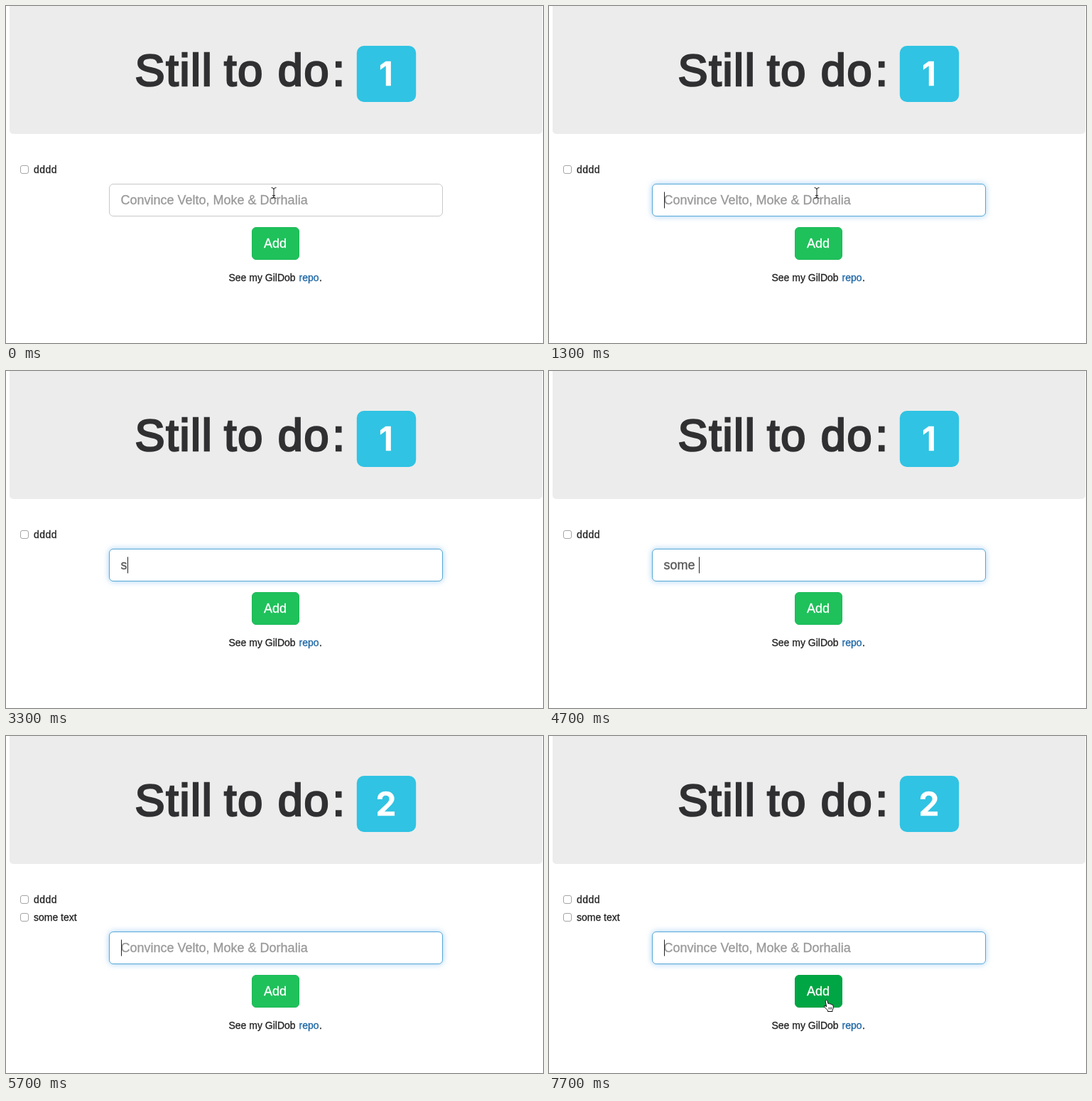
An HTML page for the animation above (8 s loop, 756x474 px).

```html
<!DOCTYPE html>
<html lang="en">
<head>
<meta charset="utf-8">
<title>Still to do</title>
<style>
  html, body { margin: 0; width: 100%; height: 100%; overflow: hidden; background: #fff; }
  svg { display: block; }
  text {
    font: 14px "Liberation Sans", Helvetica, Arial, sans-serif;
    fill: currentColor; stroke: currentColor; stroke-width: .3px;
    color: #222; white-space: pre;
  }
  .title text { font-size: 63px; letter-spacing: 1.7px; stroke-width: 2.6px; color: #303032; }
  #count { font: bold 46px Inter, Helvetica, sans-serif; color: #fff; text-anchor: middle; }
  .box { fill: #fff; stroke: #a5a5a5; }
  .wide { letter-spacing: .45px; }
  .field text, .button text { font-size: 18px; }
  #typed { color: #555; }
  #placeholder { color: #999; }
  .button text { color: #fff; text-anchor: middle; }
  text.link { color: #1b66a5; }
</style>
</head>
<body>
<svg width="756" height="474" viewBox="0 0 756 474">
  <path d="M5 0H755V175a5 5 0 0 1-5 5H10a5 5 0 0 1-5-5Z" fill="#ececec"/>
  <g class="title">
    <text x="181.5" y="111.5">Still</text>
    <text x="307" y="111.5">to</text>
    <text x="382.8" y="111.5">do</text>
    <text x="459.5" y="111.5">:</text>
  </g>
  <rect x="493.8" y="56" width="83.4" height="79" rx="10" fill="#30c3e3"/>
  <text id="count" x="535" y="111.5">1</text>

  <rect class="box" x="20.5" y="224.5" width="11" height="11" rx="2.5"/>
  <text class="wide" x="39" y="235">dddd</text>
  <g id="added">
    <rect class="box" x="20.5" y="249.5" width="11" height="11" rx="2.5"/>
    <text x="39" y="260">some text</text>
  </g>

  <g id="form">
    <g class="field">
      <rect id="input" x="145.5" y="250.5" width="469" height="45" rx="5.5" fill="#fff"/>
      <text id="placeholder" x="161.5" y="279">Convince Velto, Moke &amp; Dorhalia</text>
      <text id="typed" x="161.5" y="279"></text>
      <path id="caret" d="M.5 261.5V284.5" stroke="#222"/>
    </g>
    <g class="button">
      <rect id="button" x="346.5" y="311.5" width="66" height="45" rx="5.5"/>
      <text x="379" y="340">Add</text>
    </g>
    <text x="313.5" y="387">See my GilDob</text>
    <text class="link" x="412.5" y="387">repo</text>
    <text x="441" y="387">.</text>
  </g>

  <path id="beam" fill="none" stroke="#222" d="M-3.5-7.5Q0-7.5 0-5Q0-7.5 3.5-7.5M0-5.5V5.5M-3.5 7.5Q0 7.5 0 5Q0 7.5 3.5 7.5M-2 3.5H2"/>
  <path id="arrow" d="M0 0V15L3.4 11.8L5.7 17L8 16L5.8 11H10.5Z" fill="#111" stroke="#fff"/>
  <g id="hand" stroke="#111" stroke-linejoin="round">
    <path d="M-1.5 1Q0-1 1.5 1L2.5 5Q4 4 5 5.5Q6.5 4.8 7.5 6.3Q9.5 6 9.8 8.5Q10.3 12 8.5 14V16H2V14.5L-3 9.5Q-3.5 7.5-1.5 8L.2 9.3Z" fill="#fff"/>
    <path d="M3.5 10V13M5.5 10V13M7.3 10V13" fill="none" stroke-width=".8"/>
  </g>
</svg>
<script>
const LOOP = 8000, STEP = 100, SUBMIT = 5700;
const $ = id => document.getElementById(id);
const clamp = v => Math.max(0, Math.min(1, v));
const mix = (a, b, k) => a + (b - a) * k;
const show = (id, on) => $(id).setAttribute("visibility", on ? "visible" : "hidden");

// [time, content of the field]
const typing = [[0, ""]];
const type = (text, from, ...times) =>
  times.forEach((time, i) => typing.push([time, text.slice(0, from + i)]));
type("dhdhhddh", 1, 1400, 1500, 1600, 1700, 1800, 2300, 2400, 2500);
for (const [time, length] of [[2900, 6], [3000, 4], [3100, 2], [3200, 1]])
  type("dhdhhddh", length, time);
type("some text", 1, 3300, 3500, 3900, 4400, 4700, 4800, 5000, 5100, 5300);
typing.push([SUBMIT, ""]);

// [time, x, y] of the pointer's hot spot
const path = [[0, 377, 263], [6000, 377, 268], [6400, 381.5, 365],
              [6600, 381.5, 365], [6800, 390.5, 371.5], [LOOP, 390.5, 371.5]];

function pointerAt(t) {
  const i = path.findIndex(p => p[0] > t);
  const [a, b] = [path[i - 1], path[i]];
  const k = (t - a[0]) / (b[0] - a[0]);
  return t < 6000 ? path[0].slice(1) : [mix(a[1], b[1], k), mix(a[2], b[2], k)];
}

function draw(t) {
  const done = t >= SUBMIT;
  const shift = done ? 25 : 0;
  $("count").textContent = done ? 2 : 1;
  show("added", done);
  $("form").setAttribute("transform", `translate(0 ${shift})`);

  const focus = clamp((t - 600) / 300);
  const channel = (a, b) => Math.round(mix(a, b, focus));
  $("input").style.stroke = `rgb(${channel(200, 88)},${channel(200, 168)},${channel(200, 214)})`;
  $("input").style.filter = focus ? `drop-shadow(0 0 4px rgba(102,175,233,${.6 * focus}))` : "none";

  const value = typing.filter(k => k[0] <= t).pop()[1];
  const typed = $("typed");
  typed.textContent = value;
  typed.setAttribute("class", value[0] === "d" ? "wide" : "");
  show("placeholder", !value);

  const blinkedOff = (t >= 6100 && t < 6600) || (t >= 7200 && t < 7700);
  show("caret", focus > 0 && !blinkedOff);
  const end = value ? typed.getComputedTextLength() : 0;
  $("caret").setAttribute("transform", `translate(${Math.round(162 + end)} 0)`);

  const [x, y] = pointerAt(t);
  const visible = t < 1400 || t >= 6000;
  const overField = y > 250 + shift && y < 296 + shift;
  const overButton = t >= 6000 && y > 311 + shift;
  const kind = overField ? "beam" : overButton ? "hand" : "arrow";
  for (const id of ["beam", "hand", "arrow"]) {
    show(id, visible && id === kind);
    $(id).setAttribute("transform", `translate(${x} ${y})`);
  }
  $("button").setAttribute("fill", overButton ? "#00a643" : "#1fc15b");
  $("button").setAttribute("stroke", overButton ? "#00a040" : "#1dba57");
}

const start = performance.now();
function frame() {
  const t = (performance.now() - start) % LOOP;
  draw(Math.floor(t / STEP) * STEP);
  requestAnimationFrame(frame);
}
frame();
</script>
</body>
</html>
```
